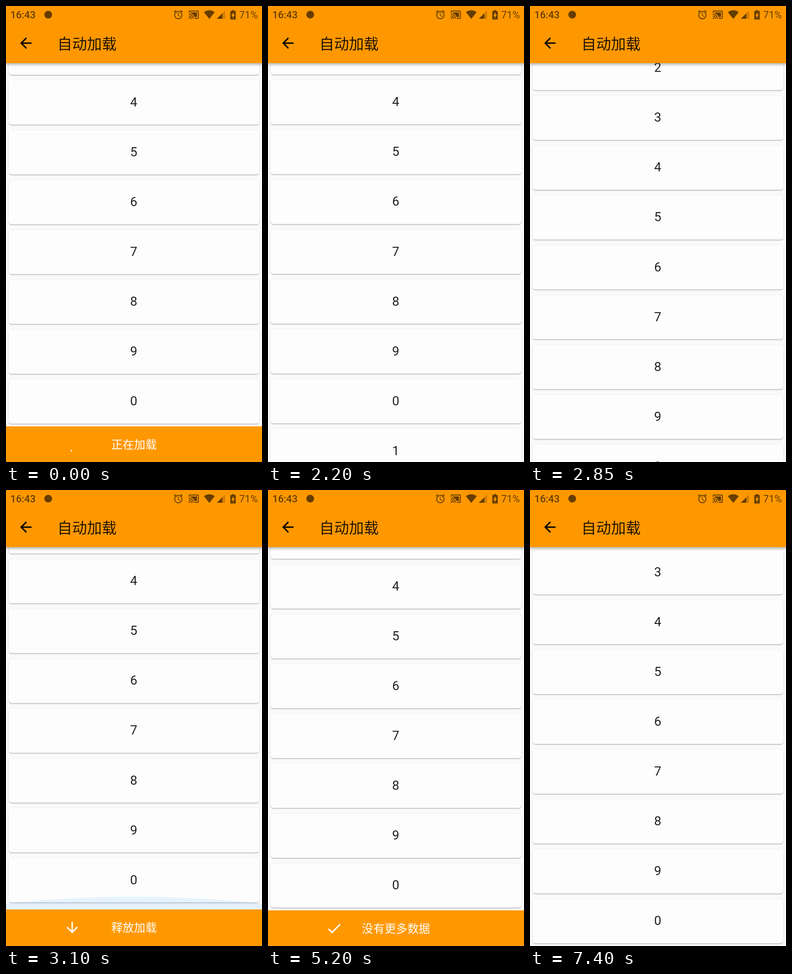
An HTML page that plays this animation: 561 px wide and 998 px high, repeating every 7450 ms.

```html
<!DOCTYPE html>
<html lang="zh-CN">
<head>
<meta charset="utf-8">
<title>自动加载</title>
<style>
  html, body { margin: 0; width: 100%; height: 100%; overflow: hidden; background: #fafafa; }
  #stage { position: relative; width: 561px; height: 998px; overflow: hidden; font-family: Roboto, "Noto Sans CJK SC", "Noto Sans CJK", sans-serif; }
  svg { position: absolute; left: 0; top: 0; }
  text { font-family: "Noto Sans CJK SC", "Noto Sans CJK", sans-serif; }
  .card {
    position: absolute; left: 6.2px; top: 0; width: 548.6px; height: 96.6px;
    border-radius: 6px; background: #fdfdfd; color: rgba(0, 0, 0, .87);
    font-size: 28px; line-height: 96.6px; text-align: center; text-indent: -1px;
    box-shadow: 0 2px 1px -1px rgba(0, 0, 40, .2), 0 1px 1px rgba(0, 0, 40, .13), 0 1px 4px rgba(0, 0, 0, .11);
  }
  #bar {
    position: absolute; left: 0; top: 0; width: 561px; height: 125px;
    background: #ff9800; box-shadow: 0 3px 6px rgba(0, 0, 0, .32);
  }
  .status, .status text { fill: #663d00; font-family: Roboto, sans-serif; }
</style>
</head>
<body>
<div id="stage">
  <div id="list"></div>

  <svg width="561" height="998">
    <circle id="glow" cx="280.5" r="2613" fill="#2196f3"/>
    <g id="footer">
      <rect id="footerBox" width="561" height="100" fill="#ff9800"/>
      <g id="content" fill="#fff">
        <text id="label" x="280.5" y="9.5" font-size="24.9" text-anchor="middle"></text>
        <circle id="spinner" cx="145" cy="0" r="13.9" fill="none" stroke="#fff" stroke-width="3.1" pathLength="360"/>
        <g id="arrow"><path transform="scale(1.558) translate(-12 -12)" d="M20 12l-1.41-1.41L13 16.17V4h-2v12.17l-5.58-5.59L4 12l8 8 8-8z"/></g>
        <path id="check" transform="translate(145 0) scale(1.558) translate(-12 -12)" d="M9 16.2L4.8 12l-1.4 1.4L9 19 21 7l-1.4-1.4L9 16.2z"/>
      </g>
    </g>
  </svg>

  <div id="bar">
    <svg width="561" height="125">
      <g class="status">
        <text x="9.5" y="27.3" font-size="21.8" font-weight="500">16:43</text>
        <circle cx="92.5" cy="19" r="8.5"/>
        <path transform="translate(365.7 7)" d="M22 5.72l-4.6-3.86-1.29 1.53 4.6 3.86L22 5.72zM7.88 3.39L6.6 1.86 2 5.71l1.29 1.53 4.59-3.85zM12.5 8H11v6l4.75 2.85.75-1.23-4-2.37V8zM12 4c-4.97 0-9 4.03-9 9s4.02 9 9 9c4.97 0 9-4.03 9-9s-4.03-9-9-9zm0 16c-3.87 0-7-3.13-7-7s3.13-7 7-7 7 3.13 7 7-3.13 7-7 7z"/>
        <path transform="translate(399.5 7)" d="M1 18v3h3c0-1.66-1.34-3-3-3zm0-4v2c2.76 0 5 2.24 5 5h2c0-3.87-3.13-7-7-7zm0-4v2c4.97 0 9 4.03 9 9h2c0-6.08-4.93-11-11-11zM19 7H5v1.63c3.96 1.28 7.09 4.41 8.37 8.37H19V7zM21 3H3c-1.1 0-2 .9-2 2v3h2V5h18v14h-7v2h7c1.1 0 2-.9 2-2V5c0-1.1-.9-2-2-2z"/>
        <path d="M433.5 13.5Q445.5 5 457.500 13.5L445.500 28.300Z"/>
        <path d="M480 10V28H462Z" opacity=".3"/>
        <path d="M474 16V28H462Z"/>
        <path fill-rule="evenodd" d="M495 11V9h5v2h3.500v18.500h-12V11ZM498.700 13.500L493.800 21.500H496.700V27L501.400 19H498.700Z"/>
        <text x="511" y="27.300" font-size="22">71%</text>
      </g>
      <path transform="translate(43.6 81.2) scale(1.558) translate(-12 -12)" d="M20 11H7.83l5.59-5.59L12 4l-8 8 8 8 1.41-1.41L7.83 13H20v-2z"/>
      <text x="112.500" y="94.800" font-size="32.500" fill="#000" fill-opacity=".87">自动加载</text>
    </svg>
  </div>
</div>

<script>
const LOOP = 7450, HEIGHT = 998, PITCH = 109.08, FOOTER = 78;
const PAGE = 10 * PITCH, LIST_END = PAGE - FOOTER, OVERSCROLL = 1102.5;
const $ = id => document.getElementById(id);
const clamp = (v, lo = 0, hi = 1) => Math.min(hi, Math.max(lo, v));
const progress = (t, from, to) => clamp((t - from) / (to - from));
const mix = (a, b, u) => a + (b - a) * u;
const smooth = u => u * u * (3 - 2 * u);
const easeOut = u => 1 - (1 - u) ** 3;

// cubic-bezier(.4, 0, .2, 1), solved by bisection
function fastOutSlowIn(x) {
  let lo = 0, hi = 1, s = .5;
  for (let i = 0; i < 18; i++) {
    s = (lo + hi) / 2;
    const bx = 1.2 * s * (1 - s) ** 2 + .6 * s * s * (1 - s) + s ** 3;
    if (bx < x) lo = s; else hi = s;
  }
  return s * s * (3 - 2 * s);
}

const cards = [];
for (let k = -1; k <= 16; k++) {
  const node = document.createElement('div');
  node.className = 'card';
  node.textContent = (k + 14) % 10;
  $('list').append(node);
  cards.push({ k, node });
}

function scrollAt(t) {
  if (t < 2600) return 359 * progress(t, 2150, 2600) ** 3;
  if (t < 3100) return mix(359, OVERSCROLL, 1 - (1 - progress(t, 2600, 2930)) ** 1.1);
  if (t < 5250) return mix(OVERSCROLL, PAGE, easeOut(progress(t, 3100, 3400)));
  return mix(PAGE, LIST_END, easeOut(progress(t, 5250, 5900)));
}

function stateAt(t) {
  if (t < 500) return ['正在加载', 'spinner'];
  if (t < 2000) return ['加载结束', 'check'];
  if (t < 2925) return ['上拉加载', 'arrow'];
  if (t < 3150) return ['释放加载', 'arrow'];
  if (t < 4450) return ['正在加载', 'spinner'];
  return ['没有更多数据', 'check'];
}

function drawSpinner(elapsed) {
  const cycle = elapsed / 1333, step = Math.floor(cycle) % 5, phase = cycle % 1;
  const head = 270 * fastOutSlowIn(clamp(phase * 2));
  const tail = 270 * fastOutSlowIn(clamp(phase * 2 - 1));
  const start = -90 + tail + phase * 306 - step * 144;
  const sweep = Math.max(head - tail, .1) + 6;
  $('spinner').setAttribute('transform', `rotate(${start - 3} 145 0)`);
  $('spinner').setAttribute('stroke-dasharray', `${sweep} ${360 - sweep}`);
}

function render(t) {
  const scroll = scrollAt(t);
  for (const { k, node } of cards) {
    node.style.transform = `translateY(${211.1 - 48.3 + k * PITCH - scroll}px)`;
  }

  const shown = t < 2000
    ? FOOTER * (1 - smooth(progress(t, 1275, 1600)))
    : clamp(scroll - LIST_END, 0, 80);
  $('footer').style.display = shown > .05 ? '' : 'none';
  $('footerBox').setAttribute('y', HEIGHT - shown);
  $('content').setAttribute('transform', `translate(0 ${959.5 + (FOOTER - shown) * .86})`);

  const [label, icon] = stateAt(t);
  $('label').textContent = label;
  for (const id of ['spinner', 'arrow', 'check']) $(id).style.display = id === icon ? '' : 'none';
  const turn = 180 * (1 - smooth(progress(t, 2925, 3075)));
  $('arrow').setAttribute('transform', `translate(145 0) rotate(${turn})`);
  drawSpinner(t < 2000 ? t + 1213 : Math.max(0, t - 3150));

  const glow = easeOut(progress(t, 2930, 3080)) * (1 - smooth(progress(t, 3100, 3600)));
  $('glow').setAttribute('cy', HEIGHT - 108 * glow + 2613);
  $('glow').setAttribute('opacity', .1 * glow);
}

const began = performance.now();
function tick() {
  render((performance.now() - began) % LOOP);
  requestAnimationFrame(tick);
}
tick();
</script>
</body>
</html>
```
